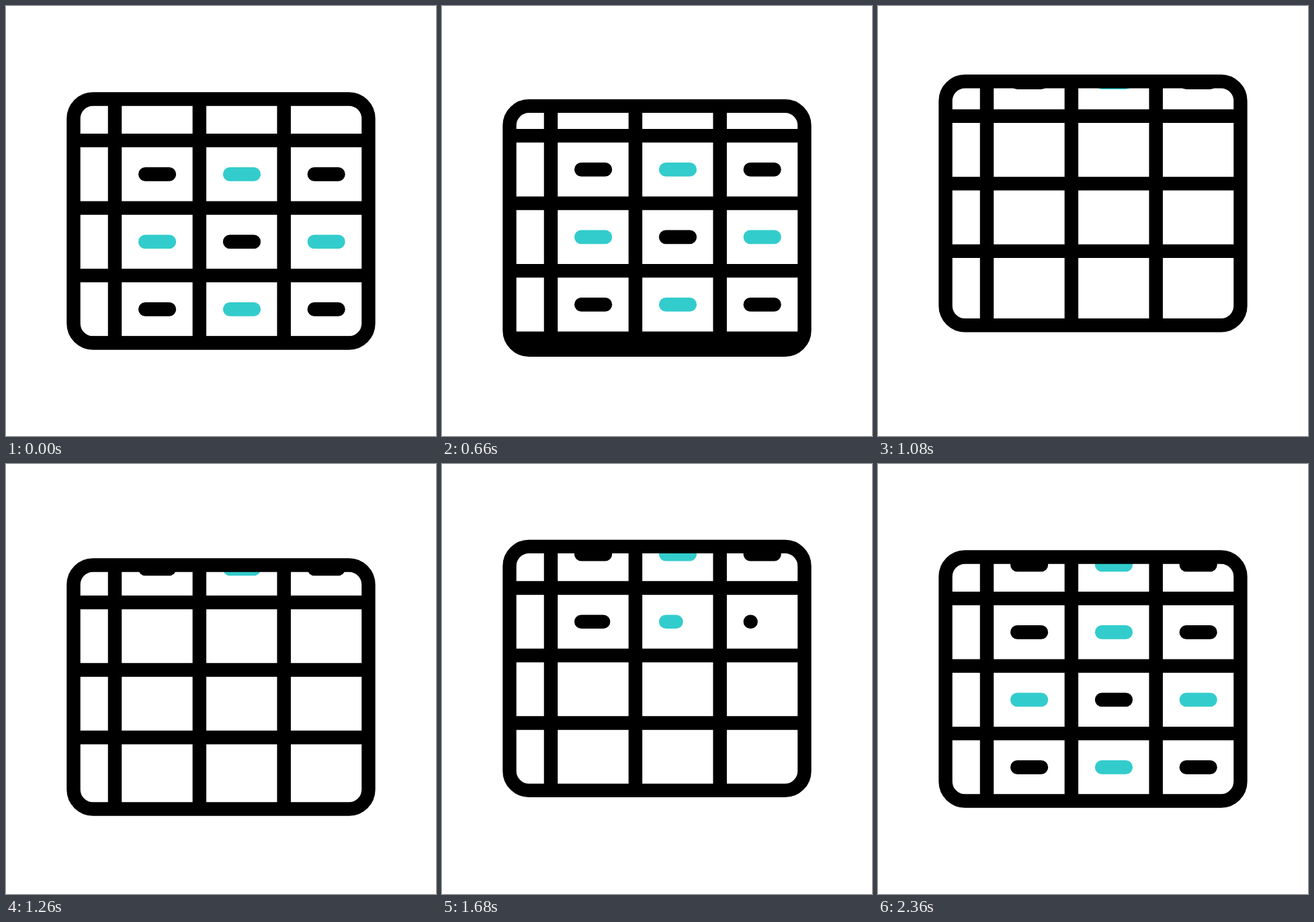
An HTML page with a canvas that plays this animation: 640 by 640 pixels, repeating every 2900 ms.

```html
<!DOCTYPE html>
<html lang="en">
<head>
<meta charset="utf-8">
<title>Scrolling table</title>
<style>
html, body { margin: 0; width: 100%; height: 100%; overflow: hidden; background: #fff; }
canvas { display: block; width: 640px; height: 640px; }
</style>
</head>
<body>
<canvas id="stage" width="640" height="640"></canvas>
<script>
const ctx = document.getElementById('stage').getContext('2d');
const LOOP = 2900, STEP = 20;
const BLACK = '#000', TEAL = '#33cccc';
const PITCH = 100.5, FIRST_LINE = 200.1, FIRST_DASH = 250.4;
const COLS = [162, 287.9, 413.7];
const DASH_X = [207.3, 333.2, 458.9], DASH_LEN = 35.6;
const TYPE_START = 1500, TYPE_GAP = 80, TYPE_TIME = 220;

// Each key: time, value, skew of the ease leading into it
const FRAME_KEYS = [[240, 0], [540, 11], [1020, -30, 1.83], [1380, 26], [1700, -16], [2000, 0]];
const SCROLL_KEYS = [[240, 0], [580, 8], [1020, -3 * PITCH - 10.3], [1560, -3 * PITCH]];

const clamp = v => Math.min(1, Math.max(0, v));
const ease = p => (1 - Math.cos(Math.PI * p)) / 2;

function valueAt(keys, t) {
  if (t <= keys[0][0]) return keys[0][1];
  for (let i = 1; i < keys.length; i++) {
    const [t0, v0] = keys[i - 1];
    const [t1, v1, skew = 1] = keys[i];
    if (t < t1) return v0 + (v1 - v0) * ease(((t - t0) / (t1 - t0)) ** skew);
  }
  return keys[keys.length - 1][1];
}

function line(x0, y0, x1, y1, width, color, cap) {
  ctx.lineWidth = width;
  ctx.strokeStyle = color;
  ctx.lineCap = cap;
  ctx.beginPath();
  ctx.moveTo(x0, y0);
  ctx.lineTo(x1, y1);
  ctx.stroke();
}

function dashes(shift, grown) {
  for (let i = 0; i < 9; i++) {
    const p = grown(i);
    if (p <= 0) continue;
    const x = DASH_X[i % 3];
    const y = FIRST_DASH + Math.floor(i / 3) * PITCH + shift;
    line(x, y, x + Math.max(0.1, DASH_LEN * p), y, 20.6, i % 2 ? TEAL : BLACK, 'round');
  }
}

function framePath() {
  ctx.beginPath();
  ctx.roundRect(100.5, 138.5, 439, 363, 29);
}

function draw(t) {
  const scroll = valueAt(SCROLL_KEYS, t);
  ctx.fillStyle = '#fff';
  ctx.fillRect(0, 0, 640, 640);
  ctx.save();
  ctx.translate(0, valueAt(FRAME_KEYS, t));

  ctx.save();
  framePath();
  ctx.clip();
  dashes(scroll, () => 1);
  dashes(0, i => ease(clamp((t - TYPE_START - i * TYPE_GAP) / TYPE_TIME)));
  for (let k = 0; k < 6; k++) {
    const y = FIRST_LINE + k * PITCH + scroll;
    line(100, y, 540, y, 20.4, BLACK, 'butt');
  }
  for (const x of COLS) line(x, 138, x, 502, 20.5, BLACK, 'butt');
  ctx.restore();

  framePath();
  ctx.lineWidth = 20.4;
  ctx.strokeStyle = BLACK;
  ctx.stroke();
  ctx.restore();
}

const start = performance.now();
function tick() {
  const t = (performance.now() - start) % LOOP;
  draw(Math.floor(t / STEP) * STEP);
  requestAnimationFrame(tick);
}
tick();
</script>
</body>
</html>
```
